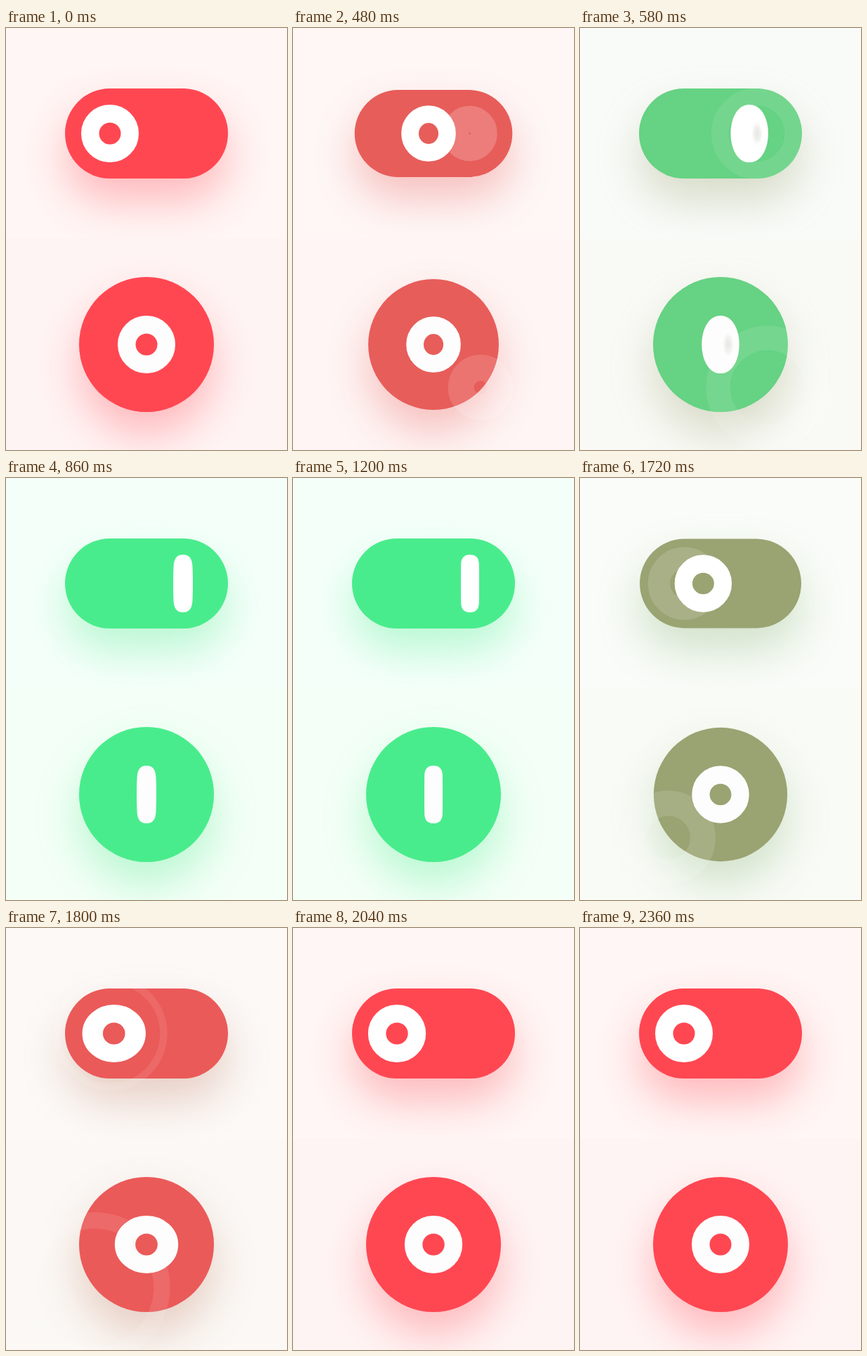
Write an HTML page that moves like this. It is 400 px wide and 600 px high and loops after 2.38 s.

```html
<!DOCTYPE html>
<html lang="en">
<head>
<meta charset="utf-8">
<title>Zero and one switches</title>
<style>
  html, body { margin: 0; width: 100%; height: 100%; overflow: hidden; }
  body > svg { display: block; width: 100vw; height: 100vh; }
</style>
</head>
<body>
<svg id="stage" viewBox="0 0 400 600">
  <defs>
    <filter id="blur" filterUnits="userSpaceOnUse" x="-300" y="-300" width="600" height="600" color-interpolation-filters="sRGB">
      <feGaussianBlur stdDeviation="31"/>
    </filter>
    <radialGradient id="dent">
      <stop offset="0" stop-color="#e6e6e4"/>
      <stop offset=".5" stop-color="#eeeeec" stop-opacity=".85"/>
      <stop offset="1" stop-color="#fff" stop-opacity="0"/>
    </radialGradient>
  </defs>
</svg>
<script>
const LOOP = 2380, HALF = LOOP / 2, TOGGLE = 440, PRESS = 200;
const RED = [255, 71, 82], GREEN = [73, 236, 140];
const RING = 28.25, TUBE = 25.5, HOLE = 15.5;

const stage = document.getElementById('stage');
const clamp = x => Math.min(1, Math.max(0, x));
const mod = (a, n) => ((a % n) + n) % n;
const smooth = x => { x = clamp(x); return x * x * (3 - 2 * x); };
const mix = (a, b, k) => `rgb(${a.map((v, i) => Math.round(v + (b[i] - v) * k))})`;

// Piecewise linear curve through [time, value] points
function curve(points, x) {
  if (x <= points[0][0]) return points[0][1];
  for (let i = 1; i < points.length; i++) {
    const [x0, y0] = points[i - 1], [x1, y1] = points[i];
    if (x < x1) return y0 + (y1 - y0) * (x - x0) / (x1 - x0);
  }
  return points[points.length - 1][1];
}

function add(parent, name, attrs = {}) {
  const el = document.createElementNS('http://www.w3.org/2000/svg', name);
  set(el, attrs);
  parent.appendChild(el);
  return el;
}
function set(el, attrs) {
  for (const key in attrs) el.setAttribute(key, attrs[key]);
}

function makeSwitch(o) {
  const panel = add(stage, 'svg', { y: o.y, width: 400, height: 300, viewBox: '0 0 400 300', overflow: 'hidden' });
  const box = { x: -o.w / 2, y: -o.h / 2, width: o.w, height: o.h, rx: o.h / 2 };
  const back = add(panel, 'rect', { width: 400, height: 300 });
  const body = add(panel, 'g');
  const lift = add(body, 'g', { transform: 'translate(0 32)' });
  const shadow = add(lift, 'rect', { ...box, filter: 'url(#blur)', opacity: .35 });
  const base = add(body, 'rect', box);
  const ripple = add(panel, 'circle', { fill: 'none', stroke: '#fff' });
  const front = add(panel, 'g');
  const icon = add(front, 'g');
  const torus = add(icon, 'ellipse', { ry: RING, fill: o.white, stroke: o.white, 'stroke-width': TUBE });
  const dent = add(icon, 'ellipse', { ry: 20, fill: 'url(#dent)' });
  const hole = add(icon, 'ellipse', { ry: HOLE });
  return { ...o, back, body, shadow, base, ripple, front, icon, torus, dent, hole };
}

const switches = [
  makeSwitch({
    y: 0, w: 232, h: 128, travel: 52, white: '#fff',
    bg: [[255, 246, 245], [245, 255, 250]],
    spot: { on: [251.5, 150], off: [148.5, 150] },
    outer: [[-200, 0], [-110, 37], [0, 37.5], [40, 39], [140, 64], [170, 81], [200, 88]],
    inner: [[36, 0], [40, 1], [140, 39], [170, 70], [200, 88]],
    alpha: [[-200, .1], [-130, .2], [40, .2], [140, .09], [200, .09]]
  }),
  makeSwitch({
    y: 300, w: 192, h: 192, travel: 0, white: '#fdfdfd',
    bg: [[255, 244, 244], [244, 255, 247]],
    spot: { on: [267, 211], off: [126, 211.5] },
    outer: [[-200, 0], [-110, 37], [0, 40], [40, 46], [140, 87], [170, 107], [215, 132]],
    inner: [[25, 0], [40, 9], [140, 52], [170, 83], [215, 132]],
    alpha: [[-200, .08], [-130, .16], [40, .14], [140, .1], [215, .09]]
  })
];

// How far the ring faces the viewer: 1 is front, 0 is side
function facing(on, u) {
  if (on) return 1 / (1 + Math.pow(u / 140, 2.78));
  const v = Math.max(0, u - 20);
  return 1 - Math.exp(-v / 80) * Math.cos(v / 45);
}

function draw(time) {
  const t = mod(time, LOOP);
  const u = mod(t - TOGGLE, HALF);
  const on = mod(Math.floor((t - TOGGLE) / HALF), 2) === 0;
  const p = mod(t - TOGGLE + PRESS, HALF) - PRESS;
  const next = mod(Math.floor((t - TOGGLE + PRESS) / HALF), 2) === 0 ? 'on' : 'off';

  const toward = x => on ? x : 1 - x;
  const tint = toward(1 - Math.exp(-Math.pow(u / (on ? 105 : 118), 2.06)));
  const glow = toward(1 - Math.exp(-Math.pow(u / 164, 1.41)));
  const side = toward(1 - Math.pow(1 - clamp(u / 400), 5.2)) * 2 - 1;
  const scale = 1 - .042 * (p < 0 ? smooth((p + PRESS) / PRESS) : 1 - smooth(p / 130));
  const c = Math.max(0, facing(on, u));
  const tilt = Math.sqrt(Math.abs(1 - c * c));
  const color = mix(RED, GREEN, tint);
  const pose = `translate(200 150) scale(${scale})`;

  for (const s of switches) {
    set(s.back, { fill: mix(s.bg[0], s.bg[1], glow) });
    set(s.body, { transform: pose });
    set(s.front, { transform: pose });
    set(s.shadow, { fill: mix(RED, GREEN, glow) });
    set(s.base, { fill: color });

    const out = curve(s.outer, p), inn = curve(s.inner, p);
    set(s.ripple, {
      cx: s.spot[next][0], cy: s.spot[next][1], r: (out + inn) / 2,
      'stroke-width': out - inn,
      'stroke-opacity': out - inn > .1 ? curve(s.alpha, p) : 0
    });

    set(s.icon, { transform: `translate(${side * s.travel} 0)` });
    set(s.torus, { rx: Math.max(.01, RING * c) });
    set(s.dent, {
      cx: (on ? 12.7 : -12.7) * tilt, rx: 1 + 17 * c,
      opacity: clamp(1.5 * tilt * tilt) * clamp((c - .08) / .3)
    });
    const open = Math.min(1.02, Math.max(0, (c - .5) / .5));
    set(s.hole, { rx: HOLE * open, fill: color, opacity: clamp(open * 8) });
  }
}

function tick() {
  draw(performance.now() - start);
  requestAnimationFrame(tick);
}
const start = performance.now();
draw(0);
requestAnimationFrame(tick);
</script>
</body>
</html>
```
